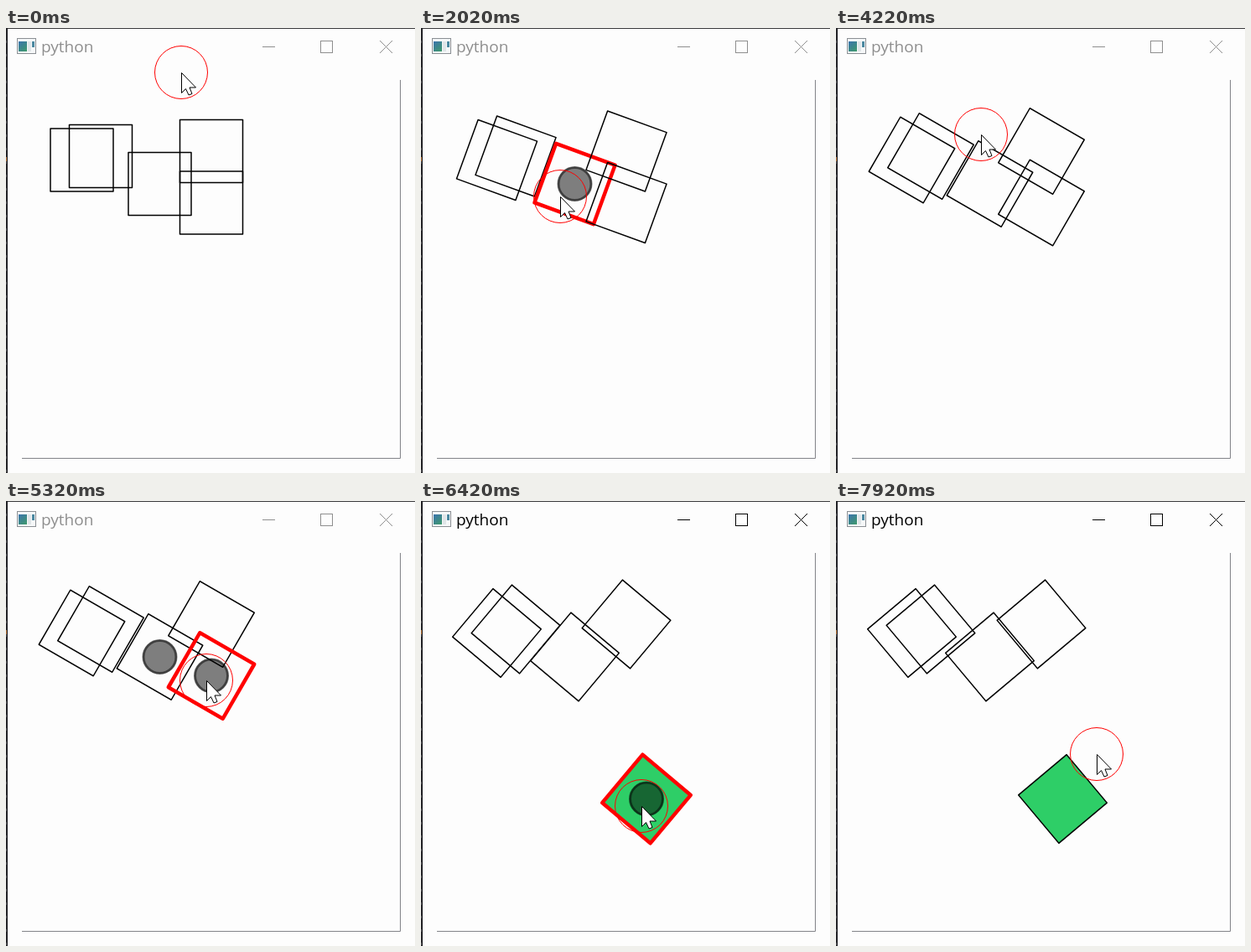
These frames come from a looping animation (488 by 531 pixels, 8 s). An HTML page with a canvas:

```html
<!DOCTYPE html>
<html lang="en">
<head>
<meta charset="utf-8">
<title>Rotating squares</title>
<style>
html, body { margin: 0; width: 100%; height: 100%; overflow: hidden; background: #fdfdfd; }
canvas { display: block; }
</style>
</head>
<body>
<canvas id="stage" width="488" height="531"></canvas>
<script>
const ctx = document.getElementById('stage').getContext('2d');
const LOOP = 8000, STEP = 100, TURN = 1660;
const SIDE = 75, REACH = 63;
const GRAB = 5620, DROP = 6620, GRIP = [6, -8.5];
const FIXED = [[90.5, 157.5], [113, 153], [183.5, 186], [245, 147]];

// Pointer moves: start ms, end ms, x, y; it rests in between
const HOME = [209, 53];
const MOVES = [
  [120, 220, 213, 53],
  [820, 1820, 166, 201],
  [2520, 2720, 182, 185],
  [3220, 3620, 271, 239],
  [3620, 4220, 173, 127],
  [4220, 4920, 186, 185],
  [4920, 5320, 239, 214],
  [5320, 5420, 239, 217],
  [GRAB, 6420, 263, 364],
  [6520, DROP, 264.5, 364],
  [DROP, 7220, 368, 345],
  [7320, 7520, 285, 342],
  [7720, 7920, 311, 302]
];

const clamp = (v, lo, hi) => Math.min(hi, Math.max(lo, v));

function pointerAt(t) {
  let [x, y] = HOME;
  for (const [from, to, px, py] of MOVES) {
    const u = clamp((t - from) / (to - from), 0, 1);
    x += (px - x) * u;
    y += (py - y) * u;
  }
  return [x, y];
}

// The last square follows the pointer while it is held
function draggedAt(t) {
  const [x, y] = pointerAt(clamp(t, GRAB, DROP));
  return [x + GRIP[0], y + GRIP[1]];
}

function line(color, width, ...pts) {
  ctx.strokeStyle = color;
  ctx.lineWidth = width;
  ctx.beginPath();
  pts.forEach(([x, y]) => ctx.lineTo(x, y));
  ctx.stroke();
}

function disc(x, y, r) {
  ctx.beginPath();
  ctx.arc(x, y, r, 0, Math.PI * 2);
}

function box(color, x, y, w, h) {
  ctx.fillStyle = color;
  ctx.fillRect(x, y, w, h);
}

function drawIcon() {
  box('#8a8f94', 13, 12, 23, 19);
  box('#f6f8f9', 14, 13, 21, 17);
  const g = ctx.createLinearGradient(15, 16, 25, 28);
  g.addColorStop(0, '#3c74ae');
  g.addColorStop(1, '#3f9a6b');
  box(g, 15, 16, 10, 12);
  box('#dfe5e8', 26, 16, 4, 12);
  box('#4a88a0', 31, 16, 3, 7);
}

function drawWindow(active) {
  box('#fdfdfd', 0, 0, 488, 531);
  box('#3a3a3c', 0, 0, 488, 1);
  box('#222226', 0, 0, 2, 531);
  for (let y = 15; y < 531; y += 16) box('#4c4c50', 0, y, 1, 3);
  box('#b9763a', 0, 154, 1, 5);
  drawIcon();

  const ink = active ? '#000' : '#8e8e8e';
  ctx.fillStyle = ink;
  ctx.font = '19px "Open Sans", "Noto Sans", sans-serif';
  ctx.fillText('python', 42, 29);
  line(ink, 1, [306, 22.5], [321, 22.5]);
  ctx.strokeRect(375.5, 15.5, 14, 14);
  line(ink, 1, [446, 15], [461, 30]);
  line(ink, 1, [461, 15], [446, 30]);

  line('#828489', 1, [470.5, 62], [470.5, 513.5], [19, 513.5]);
}

function contains([cx, cy], angle, [x, y]) {
  const dx = x - cx, dy = y - cy, c = Math.cos(angle), s = Math.sin(angle);
  return Math.max(Math.abs(dx * c + dy * s), Math.abs(dy * c - dx * s)) < SIDE / 2;
}

function drawSquare([x, y], angle, hot, filled) {
  ctx.save();
  ctx.translate(x, y);
  ctx.rotate(angle);
  ctx.lineJoin = 'round';
  ctx.beginPath();
  ctx.rect(-SIDE / 2, -SIDE / 2, SIDE, SIDE);
  if (filled) {
    ctx.fillStyle = '#2ece67';
    ctx.fill();
  }
  ctx.strokeStyle = hot ? '#f00' : '#000';
  ctx.lineWidth = hot ? 4.5 : 1.5;
  ctx.stroke();
  ctx.restore();
}

function drawHandle([x, y]) {
  ctx.fillStyle = ctx.strokeStyle = 'rgba(0,0,0,0.5)';
  ctx.lineWidth = 3;
  disc(x, y, 20.5);
  ctx.fill();
  disc(x, y, 19.5);
  ctx.stroke();
}

function drawPointer([x, y]) {
  ctx.strokeStyle = '#f00';
  ctx.lineWidth = 1;
  disc(x, y, 31.5);
  ctx.stroke();

  const shape = [[0, 0], [0, 24], [5, 19], [8.5, 26.5], [12.5, 25], [9.5, 17.5], [17, 17.5]];
  ctx.lineJoin = 'miter';
  ctx.beginPath();
  shape.forEach(([dx, dy]) => ctx.lineTo(x + 0.5 + dx, y + 0.5 + dy));
  ctx.closePath();
  ctx.fillStyle = '#fff';
  ctx.fill();
  ctx.strokeStyle = '#000';
  ctx.stroke();
}

function draw(now) {
  // The picture advances in steps of 100 ms
  const t = Math.max(0, Math.floor((now % LOOP - 20) / STEP) * STEP + 20);
  const angle = Math.floor((t + 1310) / TURN) * Math.PI / 18;
  const pointer = pointerAt(t);
  const squares = [...FIXED, draggedAt(t)];
  const hot = squares.map(s => contains(s, angle, pointer)).lastIndexOf(true);
  const pressed = t > GRAB;

  drawWindow(pressed);
  squares.forEach((s, i) => {
    drawSquare(s, angle, i === hot, pressed && i === FIXED.length);
    // Handles show on the hot square and on nearby ones below it
    const near = Math.hypot(s[0] - pointer[0], s[1] - pointer[1]) < REACH;
    if (i <= hot && near) drawHandle(s);
  });
  drawPointer(pointer);
}

const start = performance.now();
function tick() {
  draw(performance.now() - start);
  requestAnimationFrame(tick);
}
tick();
</script>
</body>
</html>
```
